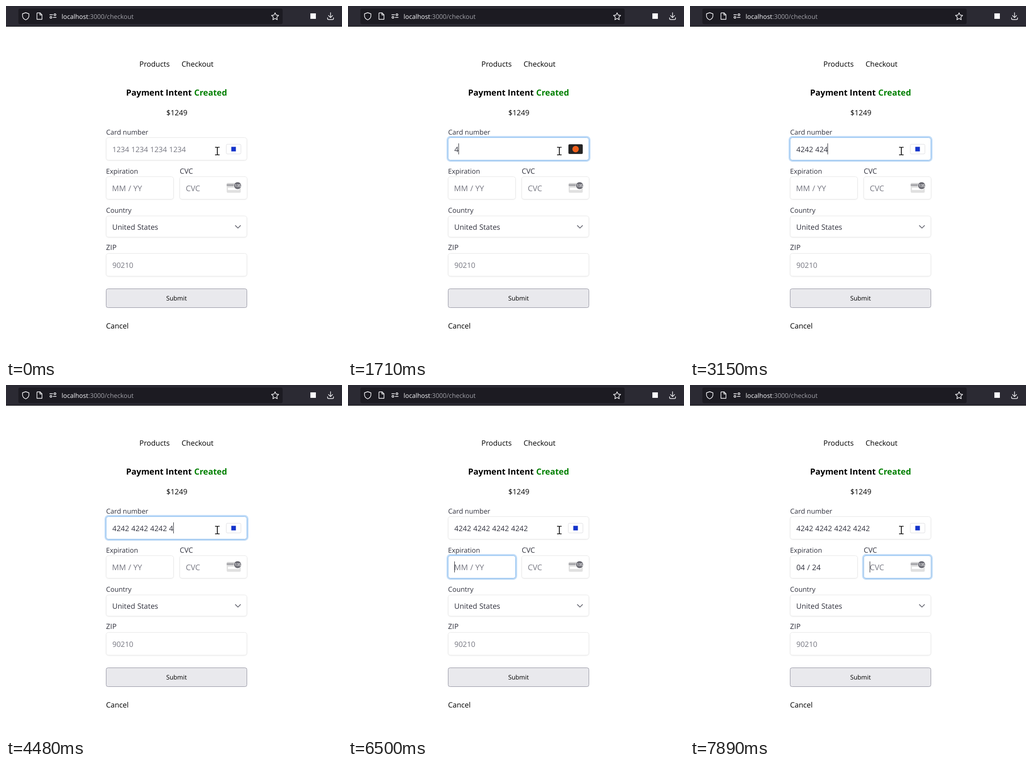
An HTML page for the animation above (8000 ms loop, 733 px wide and 764 px high).

```html
<!DOCTYPE html>
<html lang="en">
<head>
<meta charset="utf-8">
<title>Checkout</title>
<style>
  html, body { margin: 0; width: 100%; height: 100%; overflow: hidden; background: #fff; }
  svg { display: block; }
  text { font: 16px "Open Sans", "Noto Sans", sans-serif; white-space: pre; text-rendering: geometricPrecision; }
  .title { font-size: 18.3px; font-weight: 700; }
  .url { font-size: 13.9px; }
  .label { font-size: 14.85px; fill: #30313d; }
  .label.caps { font-size: 15.7px; }
  .value { fill: #30313d; word-spacing: .5px; }
  .date { font-size: 16.4px; }
  .hint { fill: #757680; word-spacing: .5px; }
  .hint.caps { font-size: 16.9px; }
  .field { fill: #fff; stroke: #e6e6e6; filter: drop-shadow(0 1px 1px rgba(0, 0, 0, .06)); }
  .icon { fill: none; stroke: #fbfbfe; stroke-width: 1.4; stroke-linecap: round; stroke-linejoin: round; }
  .ring rect { fill: none; stroke: rgba(5, 115, 225, .25); stroke-width: 3; }
  .ring rect + rect { stroke: #82b9f0; stroke-width: 1; }
</style>
</head>
<body>
<svg width="733" height="764" viewBox="0 0 733 764">
  <!-- browser bar -->
  <rect width="733" height="44" fill="#2b2a33"/>
  <rect y="44" width="733" height="1" fill="#0c0c0d"/>
  <rect x="27" y="5.5" width="576.5" height="34" rx="4" fill="#1c1b22"/>
  <g class="icon">
    <path d="M43 14.5L50 17V21C50 25.5 47 28.6 43 30.2C39 28.6 36 25.5 36 21V17Z"/>
    <path d="M68.5 15H74.5L78.5 19V29H67.5V16Q67.5 15 68.5 15ZM74 15V19.5H78.5"/>
    <path d="M95.5 19H102M103 24.8H109.5"/>
    <circle cx="106.8" cy="19" r="2"/>
    <circle cx="98" cy="24.8" r="2"/>
    <path d="M587 14.8L589.4 19.8L594.8 20.5L590.8 24.3L591.8 29.8L587 27.1L582.2 29.8L583.2 24.3L579.2 20.5L584.6 19.8Z"/>
    <path d="M708 14.5V25M703.5 20.8L708 25.2L712.5 20.8M701.5 25.5V27.5Q701.5 29.5 703.5 29.5H712.5Q714.5 29.5 714.5 27.5V25.5"/>
  </g>
  <rect x="664" y="16" width="12" height="12" fill="#fbfbfe"/>
  <text class="url" x="121.3" y="28" fill="#fbfbfe">localhost<tspan fill="#a2a2a9">:3000/checkout</tspan></text>

  <!-- page -->
  <text x="291" y="132.3">Products</text>
  <text x="383" y="132.3">Checkout</text>
  <text class="title" x="262" y="195">Payment Intent</text>
  <text class="title" x="410.5" y="195" fill="#008000">Created</text>
  <text x="349.8" y="238">$1249</text>

  <text class="label" x="218.5" y="279.5">Card number</text>
  <text class="label" x="218.2" y="364.5">Expiration</text>
  <text class="label caps" x="379" y="364.5">CVC</text>
  <text class="label" x="218.3" y="449.5">Country</text>
  <text class="label caps" x="218.3" y="531.3">ZIP</text>

  <rect class="field" x="218.5" y="286.5" width="307" height="49" rx="5"/>
  <rect class="field" x="218.5" y="371.5" width="147" height="49" rx="5"/>
  <rect class="field" x="379" y="371.5" width="147" height="49" rx="5"/>
  <rect class="field" x="218.5" y="457" width="307" height="46" rx="5"/>
  <rect class="field" x="218.5" y="538.5" width="307" height="49.5" rx="5"/>
  <g id="rings"></g>

  <text class="hint" id="cardHint" x="232" y="318">1234 1234 1234 1234</text>
  <text class="value" id="card" x="232" y="318"></text>
  <text class="hint caps" id="dateHint" x="231.3" y="403">MM / YY</text>
  <text class="value date" id="date" x="232" y="403"></text>
  <text class="hint caps" x="392.3" y="403">CVC</text>
  <text class="value" x="231.8" y="487">United States</text>
  <text class="hint" x="232" y="570.3">90210</text>
  <path d="M500.5 478L506 483.3L511.5 478" fill="none" stroke="#6d6e78" stroke-width="1.8" stroke-linecap="round" stroke-linejoin="round"/>

  <!-- card kinds -->
  <g>
    <rect x="480.5" y="301" width="32" height="21" rx="2.5" fill="#fff" stroke="#dcdce0"/>
    <rect x="491.5" y="306.5" width="10" height="10" fill="#1434cb"/>
  </g>
  <g id="altCard">
    <rect x="481" y="301" width="31" height="21" rx="2.5" fill="#252525"/>
    <circle cx="496.5" cy="311.5" r="7" fill="#f0601c"/>
  </g>

  <!-- security code card -->
  <rect x="481.5" y="385" width="30.5" height="21.5" rx="2.5" fill="#e0e0e0"/>
  <rect x="481.5" y="387.5" width="30.5" height="4.5" fill="#a9a9ad"/>
  <rect x="484" y="395.5" width="25" height="5" rx="1" fill="#fff"/>
  <circle cx="505.3" cy="391" r="8" fill="#6a6a72" stroke="#fff" stroke-width=".8"/>
  <text x="505.3" y="394.2" text-anchor="middle" fill="#fff" style="font-size:8.2px;font-weight:600;letter-spacing:-.4px">135</text>

  <rect x="218.5" y="615.5" width="307" height="41" rx="4" fill="#e9e9ed" stroke="#8f8f9d"/>
  <text x="372" y="641.3" text-anchor="middle" style="font-size:13.6px">Submit</text>
  <text x="218.2" y="702">Cancel</text>

  <rect id="caret" width="1" height="24" fill="#1a1b22"/>

  <!-- pointer -->
  <g fill="none">
    <path d="M456 307.5H460L461 308.5L462 307.5H466M461 308V323.5M456 324H460L461 323L462 324H466" stroke="#fff" stroke-width="3.4"/>
    <path d="M456 307.5H460L461 308.5L462 307.5H466M461 308V323.5M456 324H460L461 323L462 324H466" stroke="#000" stroke-width="1.7"/>
  </g>
</svg>
<script>
const LOOP = 8000;
const CARD = "4242 4242 4242 4242";
const DATES = ["", "04 / ", "04 / 2", "04 / 24"];
const cardKeys = [1710, 1920, 2260, 2460, 2730, 2930, 3080, 3340,
                  3610, 3810, 4010, 4150, 4480, 4670, 4960, 5220];
const dateKeys = [7080, 7280, 7480];
const caretOff = [[0, 960], [1500, 1710], [2460, 2530], [3080, 3150], [4150, 4210],
                  [4670, 4740], [5750, 6290], [6890, 7080], [7480, 7550], [7750, 7810]];
const focusTimes = { card: [885, 6350], date: [6350, 7735], code: [7735, LOOP + 500] };

const el = id => document.getElementById(id);
const pressed = (keys, t) => keys.filter(k => k <= t).length;
const ramp = (t, start, length) => {
  const p = Math.min(1, Math.max(0, (t - start) / length));
  return p * p * (3 - 2 * p);
};

function addRing(x, y, w, h) {
  const box = (grow, r) => `<rect x="${x - grow}" y="${y - grow}" width="${w + 2 * grow}" height="${h + 2 * grow}" rx="${r}"/>`;
  el("rings").insertAdjacentHTML("beforeend", `<g class="ring">${box(2, 7)}${box(0, 5)}</g>`);
  return el("rings").lastElementChild;
}

const rings = {
  card: addRing(218.5, 286.5, 307, 49),
  date: addRing(218.5, 371.5, 147, 49),
  code: addRing(379, 371.5, 147, 49)
};

function setField(id, value) {
  const node = el(id);
  if (node.textContent !== value) node.textContent = value;
  el(id + "Hint").style.display = value ? "none" : "";
}

const textWidth = id => el(id).textContent ? el(id).getComputedTextLength() : 0;

function placeCaret(t) {
  const caret = el("caret");
  const hidden = caretOff.some(([from, to]) => t >= from && t < to);
  caret.style.display = hidden ? "none" : "";
  let x = 232, y = 299;
  if (t < focusTimes.card[1]) x += textWidth("card");
  else {
    y = 384;
    if (t < focusTimes.date[1]) x += textWidth("date");
    else x = 392;
  }
  caret.setAttribute("x", Math.floor(x + 0.2));
  caret.setAttribute("y", y);
}

function draw(t) {
  const n = pressed(cardKeys, t);
  setField("card", CARD.slice(0, n + Math.floor(n / 4)));
  setField("date", DATES[pressed(dateKeys, t)]);
  for (const [name, [on, off]] of Object.entries(focusTimes))
    rings[name].style.opacity = ramp(t, on, 150) * (1 - ramp(t, off, 150));
  el("altCard").style.opacity = ramp(t, 880, 430) * (1 - ramp(t, 1700, 420));
  placeCaret(t);
}

const start = performance.now();
function tick() {
  draw((performance.now() - start) % LOOP);
  requestAnimationFrame(tick);
}
tick();
</script>
</body>
</html>
```
